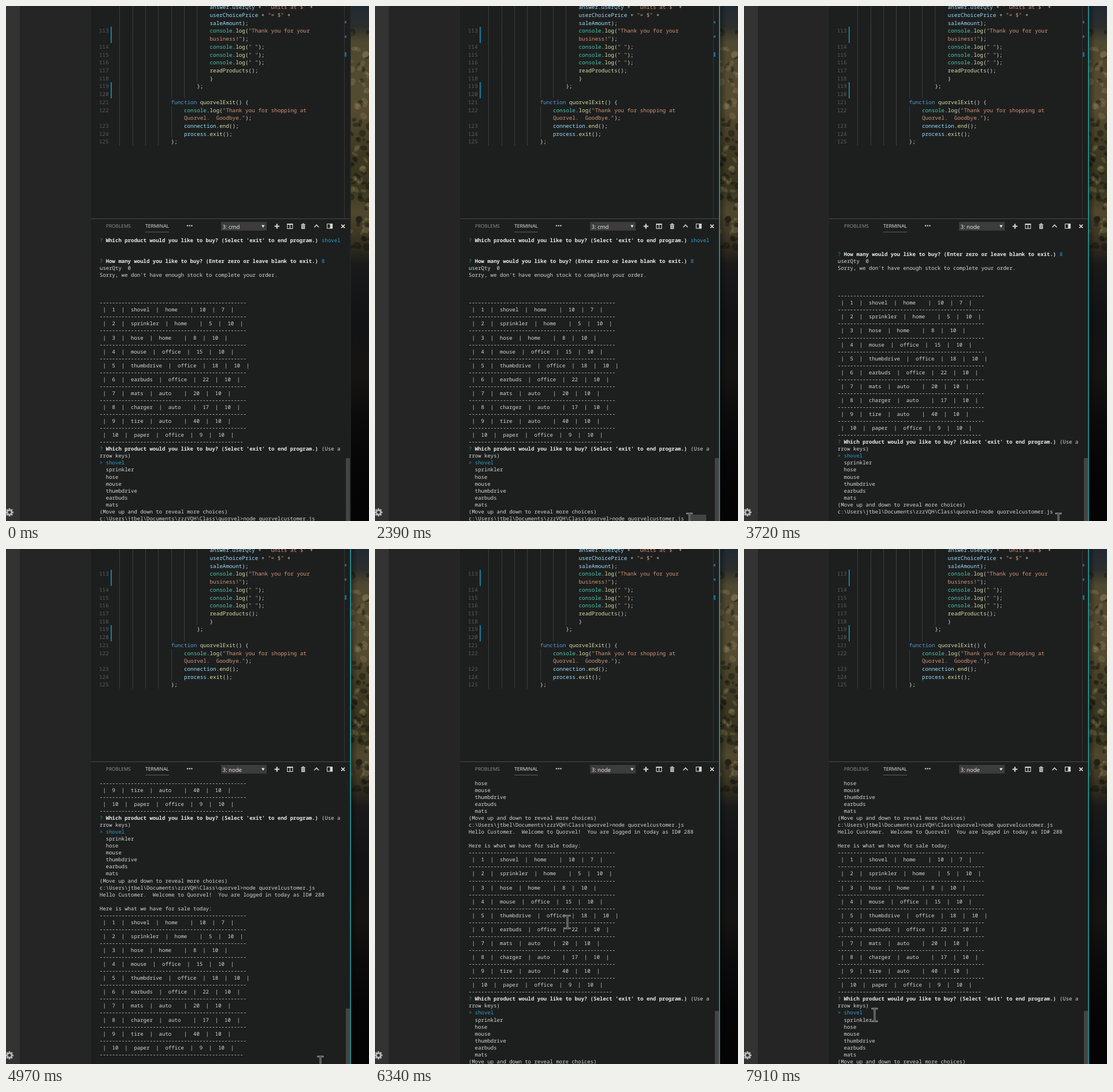
Write an HTML page with a canvas that moves like this. It is 628 by 892 pixels and loops after 8 s.

```html
<!DOCTYPE html>
<html lang="en">
<head>
<meta charset="utf-8">
<title>Store terminal</title>
<style>
html, body { margin: 0; width: 100%; height: 100%; overflow: hidden; background: #1e1e1e; }
canvas { display: block; width: 628px; height: 892px; }
</style>
</head>
<body>
<canvas id="stage" width="628" height="892"></canvas>
<script>
const ctx = document.getElementById('stage').getContext('2d');
const W = 628, H = 892, LOOP = 8000;
const MONO = '"Noto Sans Mono", "DejaVu Sans Mono", monospace';
const SANS = '"Open Sans", "Noto Sans", sans-serif';
const PAPER = '#1d1f1e';
const TERM = { x: 162, y: 408.8, cell: 5.41, row: 12.05, size: 9.017 };
const CODE = { x: 196.3, y: 5.2, cell: 5.58, row: 13.72, size: 9.3 };

const COLORS = {
  v: '#9cdcfe', p: '#d8d8d8', s: '#d2957c', f: '#dcdcaa', k: '#569cd6', c: '#4ec9b0',
  t: '#d6d6d6', b: '#e8e8e8', g: '#16a860', a: '#2a9fd0'
};

// Each part is a colour key, a colon and the text.
const LOG = ['c:console', 'p:.', 'f:log', 'p:('];
const BLANK_LOG = [...LOG, 's:" "', 'p:);'];
const CODE_LINES = [
  ['', 28, ['v:answer', 'p:.', 'v:userQty', 'p: + ', 's:" units at $"', 'p: +']],
  ['', 28, ['v:userChoicePrice', 'p: + ', 's:"= $"', 'p: +']],
  ['', 28, ['v:saleAmount', 'p:);']],
  ['113', 28, [...LOG, 's:"Thank you for your']],
  ['', 28, ['s:business!"', 'p:);']],
  ['114', 28, BLANK_LOG],
  ['115', 28, BLANK_LOG],
  ['116', 28, BLANK_LOG],
  ['117', 28, ['f:readProducts', 'p:();']],
  ['118', 28, ['p:}']],
  ['119', 24, ['p:};']],
  ['120', 24, []],
  ['121', 16, ['k:function', 'f: quorvelExit', 'p:() {']],
  ['122', 20, [...LOG, 's:"Thank you for shopping at']],
  ['', 20, ['s:Quorvel.  Goodbye."', 'p:);']],
  ['123', 20, ['v:connection', 'p:.', 'f:end', 'p:();']],
  ['124', 20, ['v:process', 'p:.', 'f:exit', 'p:();']],
  ['125', 16, ['p:};']]
];

const PRODUCTS = [
  ['shovel', 'home', 10, 7], ['sprinkler', 'home', 5, 10], ['hose', 'home', 8, 10],
  ['mouse', 'office', 15, 10], ['thumbdrive', 'office', 18, 10], ['earbuds', 'office', 22, 10],
  ['mats', 'auto', 20, 10], ['charger', 'auto', 17, 10], ['tire', 'auto', 40, 10],
  ['paper', 'office', 9, 10]
];
const plain = text => ['t:' + text];
const table = [
  ...PRODUCTS.flatMap(([name, dept, price, stock], i) => [
    plain('-'.repeat(47)),
    plain(` |  ${i + 1}  |  ${name}  |  ${dept.padEnd(6)}  |  ${price}  |  ${stock}  |`)
  ]),
  plain('-'.repeat(46))
];
const WHICH = "b:Which product would you like to buy? (Select 'exit' to end program.)";
const menu = [
  ['g:? ', WHICH, 't: (Use a'],
  plain('rrow keys)'),
  ['a:> shovel'],
  ...PRODUCTS.slice(1, 7).map(p => plain('  ' + p[0])),
  plain('(Move up and down to reveal more choices)')
];
const OUTPUT = [
  ['g:? ', WHICH, 'a: shovel'],
  [], [],
  ['g:? ', 'b:How many would you like to buy? (Enter zero or leave blank to exit.)', 'a: 8'],
  plain('userQty  0'),
  plain("Sorry, we don't have enough stock to complete your order."),
  [], [], [],
  ...table,
  ...menu,
  plain('c:\\Users\\jtbel\\Documents\\zzzVQH\\Class\\quorvel>node quorvelcustomer.js'),
  plain('Hello Customer.  Welcome to Quorvel!  You are logged in today as ID# 288'),
  [],
  plain('Here is what we have for sale today:'),
  ...table,
  ...menu
];

// start, first line shown, lines printed, top of the scrollbar
const SCREENS = [[0, 0, 41, 783], [3620, 1, 41, 783], [4970, 25, 65, 796], [5050, 34, 75, 800]];

// start, end, steps, way points of the pointer
const MOVES = [
  [660, 740, 2, [[574, 889], [557, 889]]],
  [880, 1140, 4, [[552, 887], [525, 882]]],
  [1660, 1830, 3, [[530, 884], [544, 890]]],
  [5430, 6120, 10, [[524, 864], [384.5, 673], [336, 602]]],
  [6270, 7060, 11, [[335, 612], [331, 680], [323, 750], [314, 808], [305, 843], [267, 846]]],
  [7140, 7440, 5, [[258, 840], [227, 807]]],
  [7910, 7910, 1, [[226, 807]]]
];

const lastStarted = (list, t) => list.filter(item => item[0] <= t).pop();

function rect(x, y, w, h, color) {
  ctx.fillStyle = color;
  ctx.fillRect(x, y, w, h);
}

function label(text, x, y, size, color, family = SANS, weight = 400) {
  ctx.font = `${weight} ${size}px ${family}`;
  ctx.fillStyle = color;
  ctx.fillText(text, x, y);
}

function path(color, width, ...lines) {
  ctx.strokeStyle = color;
  ctx.lineWidth = width;
  ctx.beginPath();
  for (const line of lines) {
    line.forEach(([x, y], i) => i ? ctx.lineTo(x, y) : ctx.moveTo(x, y));
  }
  ctx.stroke();
}

function textRow(grid, row, col, parts) {
  for (const part of parts) {
    const text = part.slice(2);
    label(text, grid.x + col * grid.cell, grid.y + row * grid.row, grid.size,
      COLORS[part[0]], MONO, part[0] === 'b' ? 700 : 500);
    col += text.length;
  }
}

function drawPhoto() {
  const g = ctx.createLinearGradient(0, 0, 0, H);
  const tones = [[0, '#212a33'], [.04, '#2b2e2c'], [.07, '#4f4830'], [.2, '#544b31'],
    [.29, '#3d3822'], [.35, '#37351f'], [.4, '#50482e'], [.46, '#353020'], [.5, '#1a1a1a'],
    [.6, '#121315'], [.72, '#151412'], [.8, '#0b0b0c'], [.9, '#050506'], [1, '#040405']];
  tones.forEach(([at, color]) => g.addColorStop(at, color));
  rect(596, 0, 32, H, g);
  let seed = 7;
  const rnd = () => (seed = seed * 16807 % 2147483647) / 2147483647;
  for (let i = 0; i < 90; i++) {
    ctx.fillStyle = i % 2 ? 'rgba(14,15,11,.4)' : 'rgba(150,135,92,.28)';
    ctx.beginPath();
    ctx.ellipse(597 + rnd() * 31, 45 + rnd() * 375, 2 + rnd() * 5, 2 + rnd() * 5, rnd() * 3, 0, 7);
    ctx.fill();
  }
}

function drawGear() {
  ctx.save();
  ctx.translate(6, 877);
  ctx.fillStyle = '#b4b4b4';
  for (let i = 0; i < 8; i++) {
    ctx.fillRect(-1.4, -7, 2.8, 4);
    ctx.rotate(Math.PI / 4);
  }
  ctx.strokeStyle = '#b4b4b4';
  ctx.lineWidth = 2.8;
  ctx.beginPath();
  ctx.arc(0, 0, 3.9, 0, 7);
  ctx.stroke();
  ctx.restore();
}

function drawEditor() {
  CODE_LINES.forEach(([number, col, parts], row) => {
    const top = row * CODE.row - 5;
    for (let c = 0; c < col; c += 4) {
      rect(Math.round(CODE.x + c * CODE.cell), top, 1, CODE.row, '#3c3c3c');
    }
    label(number, 161, CODE.y + row * CODE.row, CODE.size, '#5a5a5a', MONO);
    textRow(CODE, row, col, parts);
  });
  rect(181, 36, 2, 28, '#147fa3');
  rect(181, 132, 2, 28, '#147fa3');
  rect(585, 0, 1, 368, '#353535');
  [[26, 4], [51, 4], [80, 8]].forEach(([y, h]) => rect(586, y, 3, h, '#156a92'));
}

function drawPanelHeader(t) {
  rect(147, 368, 448, 1, '#484848');
  label('PROBLEMS', 173, 384, 8.3, '#929292');
  label('TERMINAL', 241, 384, 8.5, '#e7e7e7');
  rect(241, 391, 41, 1, '#5c5c5c');
  ctx.fillStyle = '#d0d0d0';
  for (const x of [314, 317.7, 321.4]) {
    ctx.beginPath();
    ctx.arc(x, 380.5, 1.2, 0, 7);
    ctx.fill();
  }
  rect(372, 374, 79, 15, '#3c3c3c');
  label(t < 3720 ? '3: cmd' : '3: node', 374.5, 385.6, 9.6, '#f0f0f0');
  ctx.fillStyle = '#e8e8e8';
  ctx.beginPath();
  ctx.moveTo(442, 379.5);
  ctx.lineTo(447.5, 379.5);
  ctx.lineTo(444.75, 384);
  ctx.fill();

  const ink = '#d6d6d6';
  path(ink, 2.2, [[464.5, 381.5], [473, 381.5]], [[468.75, 377.2], [468.75, 385.8]]);
  ctx.lineWidth = 1.1;
  ctx.strokeRect(486.8, 377.5, 9, 8);
  rect(486.3, 377, 10, 2, ink);
  rect(490.8, 377, 1.2, 8.5, ink);
  rect(510.3, 378, 7.6, 1.3, ink);
  rect(512.5, 376.6, 3.2, 1.4, ink);
  rect(511, 379.8, 6.2, 6.4, ink);
  path(PAPER, .7, [[513, 380.6], [513, 385.2]], [[515.2, 380.6], [515.2, 385.2]]);
  path(ink, 1.5, [[533.3, 383.3], [537.2, 379.2], [541.1, 383.3]]);
  ctx.lineWidth = 1.1;
  ctx.strokeRect(555.6, 377.5, 9, 7.6);
  rect(560.5, 377.5, 4, 7.6, ink);
  path(ink, 1.8, [[580.2, 378.6], [586, 384.4]], [[586, 378.6], [580.2, 384.4]]);
}

function drawTerminal(t) {
  const [, first, count, barTop] = lastStarted(SCREENS, t);
  OUTPUT.slice(first, Math.min(count, first + 41))
    .forEach((parts, row) => textRow(TERM, row, 0, parts));
  const hovered = t >= 350 && t < 660;
  rect(588, barTop, 7, H - barTop, hovered ? '#545454' : '#444444');
  if (t >= 2390 && t < 3620) rect(546, 881, 27, 11, '#434343');
}

function drawFrame(t) {
  rect(595, 0, 1.5, H, '#242526');
  if (t < 2200) return;
  const strength = t < 2295 ? .5 : 1;
  const shade = ctx.createLinearGradient(597, 0, 608, 0);
  shade.addColorStop(0, `rgba(0,0,0,${.35 * strength})`);
  shade.addColorStop(1, 'rgba(0,0,0,0)');
  rect(597, 0, 11, H, shade);
  ctx.globalAlpha = strength;
  rect(595.3, 0, 1.4, H, '#20b4ba');
  ctx.globalAlpha = 1;
}

function pointerAt(t) {
  const move = lastStarted(MOVES, t);
  if (!move) return null;
  const [start, end, steps, points] = move;
  if (steps === 1) return points[0];
  const step = Math.min(steps - 1, Math.floor((t - start) / (end - start) * (steps - 1) + .25));
  const along = step / (steps - 1) * (points.length - 1);
  const i = Math.min(points.length - 2, Math.floor(along));
  return points[i].map((v, axis) => v + (points[i + 1][axis] - v) * (along - i));
}

function drawPointer(t) {
  const at = pointerAt(t);
  if (!at) return;
  const [x, y] = at.map(Math.round);
  const beam = [[[x - 4, y - 11], [x + 4, y - 11]], [[x, y - 11], [x, y + 11]],
    [[x - 4, y + 11], [x + 4, y + 11]]];
  ctx.lineCap = 'square';
  path('#d4d4d4', 2.7, ...beam);
  path('#101010', 1.2, ...beam);
  ctx.lineCap = 'butt';
}

function draw(t) {
  drawPhoto();
  rect(0, 0, 24, H, '#333333');
  rect(24, 0, 123, H, '#252526');
  rect(147, 0, 449, H, PAPER);
  drawGear();
  drawEditor();
  drawPanelHeader(t);
  drawTerminal(t);
  drawFrame(t);
  drawPointer(t);
}

ctx.textRendering = 'geometricPrecision';
const began = performance.now();
function tick() {
  draw((performance.now() - began) % LOOP);
  requestAnimationFrame(tick);
}
tick();
</script>
</body>
</html>
```
